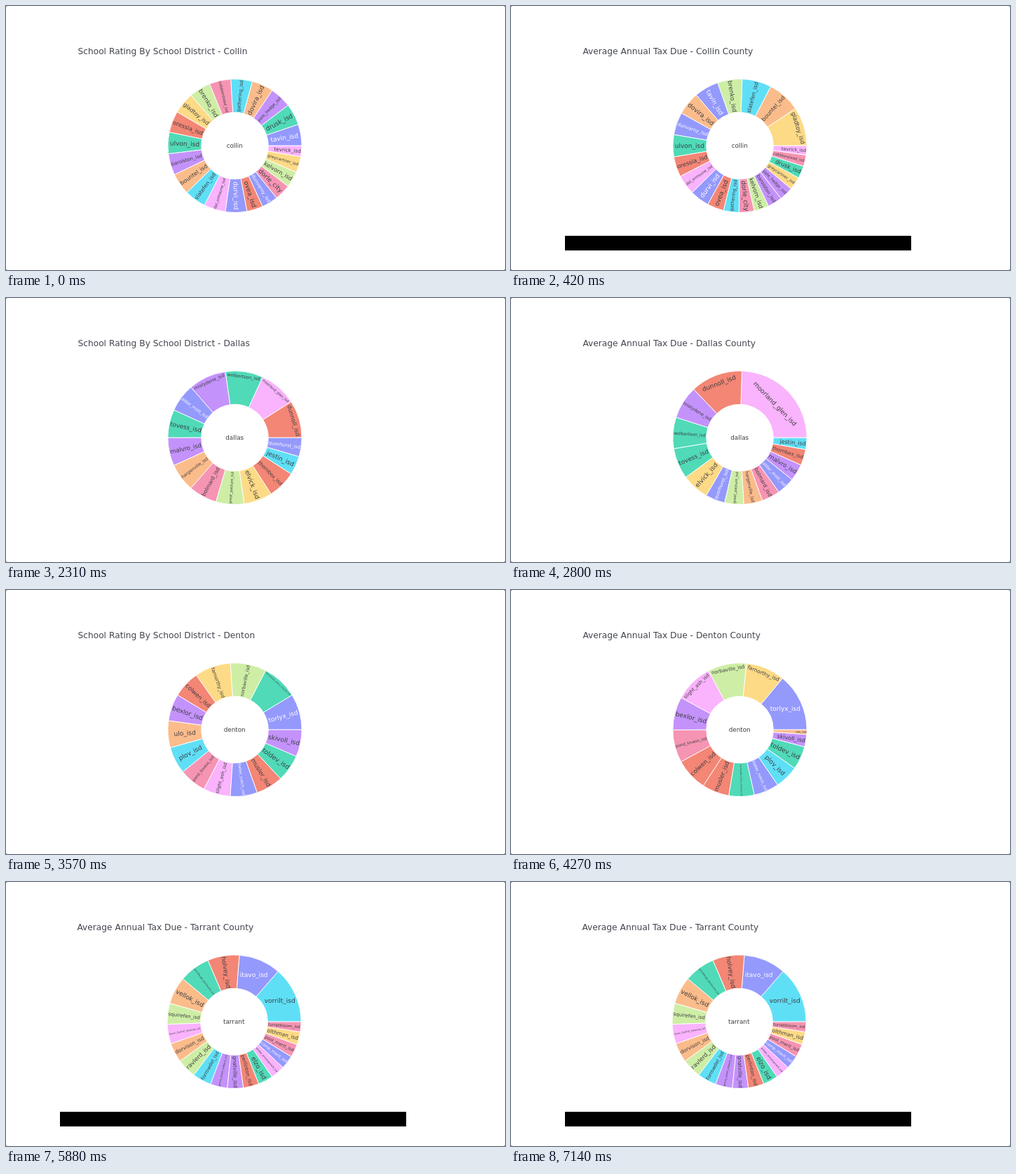
These frames come from a looping animation (712 by 378 pixels, 7210 ms). An HTML page with a canvas:

```html
<!DOCTYPE html>
<html lang="en">
<head>
<meta charset="utf-8">
<title>School districts</title>
<style>
  html, body { margin: 0; width: 100%; height: 100%; overflow: hidden; background: #fff; }
  canvas { display: block; }
</style>
</head>
<body>
<canvas id="stage" width="712" height="378"></canvas>
<script>
const ctx = document.getElementById('stage').getContext('2d');
const TAU = Math.PI * 2;
const LOOP = 7210;
const FONT = '"DejaVu Sans", Verdana, sans-serif';
const INK = '#3c3c40';
const COLORS = ['#9499fc', '#f38675', '#50dab8', '#c492fb', '#fbbc8b',
                '#5fdff6', '#f694b3', '#ceeea6', '#fab3fd', '#fdda86'];
const OUTER = 95.6, RING = 0.5, LABEL = 9, LINE = 1.2, PAD = 4.2;

// Each entry is name:rating:tax share.
const COUNTIES = {
  Collin: `tavin:8:21.2 ovea:6:14.4 drusk:8:10.8 pale_hedge:8:12 dovira:8:20.2
    gathering:8:13.4 cobblerstead:8:9.9 brenko:8:21.4 tevrick:4:8 gladtoy:8:34
    dunvarny:6:19.6 oressia:8:17.6 ulvon:8:19.3 barolston:8:12.5 bountel:8:28.5
    slatefen:8:25.5 dorle_city:6:13.2 kelvorn:6:12.9 del_ormsune:8:17.3
    greycartner:6:11.4 durvi:8:16.9`,
  Dallas: `alder_mott:6:15.5 dunnoll:8:45.3 tovess:6:26.8 malvro:6:14.7
    hargenville:6:16.2 jestin:4:10.2 bolmard:6:16 great_pasture:6:16.6
    moorland_glen:8:88.2 elvick:6:23.7 quorhurst:4:16.9 thornbex:6:13.9
    wolbertson:8:27.2 mistydene:8:28.8`,
  Denton: `torlyx:8:50.4 colwen:6:28.3 merrowdale_tillers_meadow:8:22.1 bexlor:6:28.9
    ulo:6:4 plov:6:20.5 pond_tovess:6:28.5 norbaville:8:33.6 slight_ash:6:33.4
    farnorthy:8:33.9 baker_notch:6:21.8 musler:6:23.5 toldev:6:20.3 skivoll:6:10.8`,
  Tarrant: `itavo:8:36.5 perlinton:6:13.6 elzo:6:12.9 gnatville:6:13.8 dorvison:6:16.9
    vorrilt:8:49 turretbloom:6:8.8 ravlerd:6:16.8 heron_foothill_tobanaw:6:17
    olthman:6:11.2 camp_merit:4:11.7 holvey:4:27.6 plumbough_dorreyville:8:26.9
    grove_ostrel_milbeck:8:14.8 vellok:6:23.9 forrowdel:6:16.4 pool_merit:4:11.5
    squirefen:8:18.4 amber_encampment:6:12.3`
};

const SCENES = [
  { at: 0, county: 'Collin' },
  { at: 420, county: 'Collin', tax: true, bar: true },
  { at: 1750, county: 'Dallas' },
  { at: 2800, county: 'Dallas', tax: true },
  { at: 3570, county: 'Denton' },
  { at: 4270, county: 'Denton', tax: true },
  { at: 4970, county: 'Tarrant' },
  { at: 5880, county: 'Tarrant', tax: true, bar: true }
];

function readSectors(county, tax) {
  const rows = COUNTIES[county].split(/\s+/).map((entry, i) => {
    const [name, rating, share] = entry.split(':');
    return {
      label: name.endsWith('_city') ? name : name + '_isd',
      color: COLORS[i % 10],
      ink: i % 10 ? INK : '#fff',
      value: +(tax ? share : rating)
    };
  }).sort((a, b) => b.value - a.value);

  const total = rows.reduce((sum, row) => sum + row.value, 0);
  let angle = 0;
  for (const row of rows) {
    row.start = angle;
    angle += row.value / total * TAU;
    row.end = angle;
  }
  return rows;
}

// Largest box of aspect a that fits in an annular sector.
function maxHalf(a, half) {
  const q = a + 1 / (2 * Math.tan(half));
  return Math.min(1 / (Math.sqrt(q * q + 0.5) + q),
                  RING / (Math.sqrt(a * a + RING / 2) + a));
}

function upright(angle) {
  const half = Math.PI;
  return ((angle % half) + half) % half - half / 2;
}

function fitLabel(w, h, mid, half) {
  const inscribed = Math.min(1 / (1 + 1 / Math.sin(half)), RING / 2);
  const flat = {
    scale: inscribed * OUTER * 2 / Math.hypot(w, h),
    r: 1 - inscribed,
    turn: 0
  };
  if (flat.scale >= 1) return flat;

  const place = (across, along, turn) => {
    const a = across / along, b = maxHalf(a, half);
    return { scale: b * (OUTER - PAD) * 2 / along, r: Math.cos(b) - a * b, turn: upright(turn) };
  };
  const clock = Math.PI / 2 - mid;
  return [flat, place(w, h, clock), place(h, w, clock + Math.PI / 2)]
    .reduce((best, fit) => fit.scale > best.scale ? fit : best);
}

function drawText(text, x, y, size, color, turn = 0) {
  ctx.save();
  ctx.translate(x, y);
  ctx.rotate(turn);
  ctx.font = `${size}px ${FONT}`;
  ctx.textAlign = 'center';
  ctx.fillStyle = color;
  ctx.fillText(text, 0, size * 0.345);
  ctx.restore();
}

function drawSector(s, cx, cy) {
  ctx.beginPath();
  ctx.arc(cx, cy, OUTER, -s.start, -s.end, true);
  ctx.arc(cx, cy, OUTER * RING, -s.end, -s.start);
  ctx.closePath();
  ctx.fillStyle = s.color;
  ctx.fill();
  ctx.strokeStyle = '#fff';
  ctx.lineWidth = 0.9;
  ctx.stroke();
}

function drawLabel(s, cx, cy) {
  const mid = (s.start + s.end) / 2;
  ctx.font = `${LABEL}px ${FONT}`;
  const width = ctx.measureText(s.label).width;
  const fit = fitLabel(width, LABEL * LINE, mid, (s.end - s.start) / 2);
  const r = fit.r * OUTER;
  drawText(s.label, cx + r * Math.cos(mid), cy - r * Math.sin(mid),
           LABEL * Math.min(1, fit.scale), s.ink, fit.turn);
}

function drawScene({ county, tax, bar, sectors }) {
  const shift = county === 'Tarrant' ? -1 : 0;
  const cx = 326.5 + shift, cy = 200.1;

  ctx.fillStyle = '#777';
  ctx.fillRect(0, 0, 712, 378);
  ctx.fillStyle = '#fff';
  ctx.beginPath();
  ctx.roundRect(0, 0, 712, 378, 2.5);
  ctx.fill();

  ctx.font = `12.24px ${FONT}`;
  ctx.textAlign = 'left';
  ctx.fillStyle = '#42454e';
  ctx.fillText(tax ? `Average Annual Tax Due - ${county} County`
                   : `School Rating By School District - ${county}`, 102.4 + shift, 69);

  sectors.forEach(s => drawSector(s, cx, cy));
  sectors.forEach(s => drawLabel(s, cx, cy));
  drawText(county.toLowerCase(), cx - 0.3, cy, 8.8, INK);

  if (bar) {
    ctx.fillStyle = '#000';
    ctx.fillRect(77, 329, 494, 21);
  }
}

for (const scene of SCENES) scene.sectors = readSectors(scene.county, scene.tax);

const begin = performance.now();
let shown = null;

function tick() {
  const t = Math.max(0, performance.now() - begin) % LOOP;
  const scene = SCENES.findLast(s => s.at <= t);
  if (scene !== shown) {
    drawScene(scene);
    shown = scene;
  }
  requestAnimationFrame(tick);
}
tick();
</script>
</body>
</html>
```
